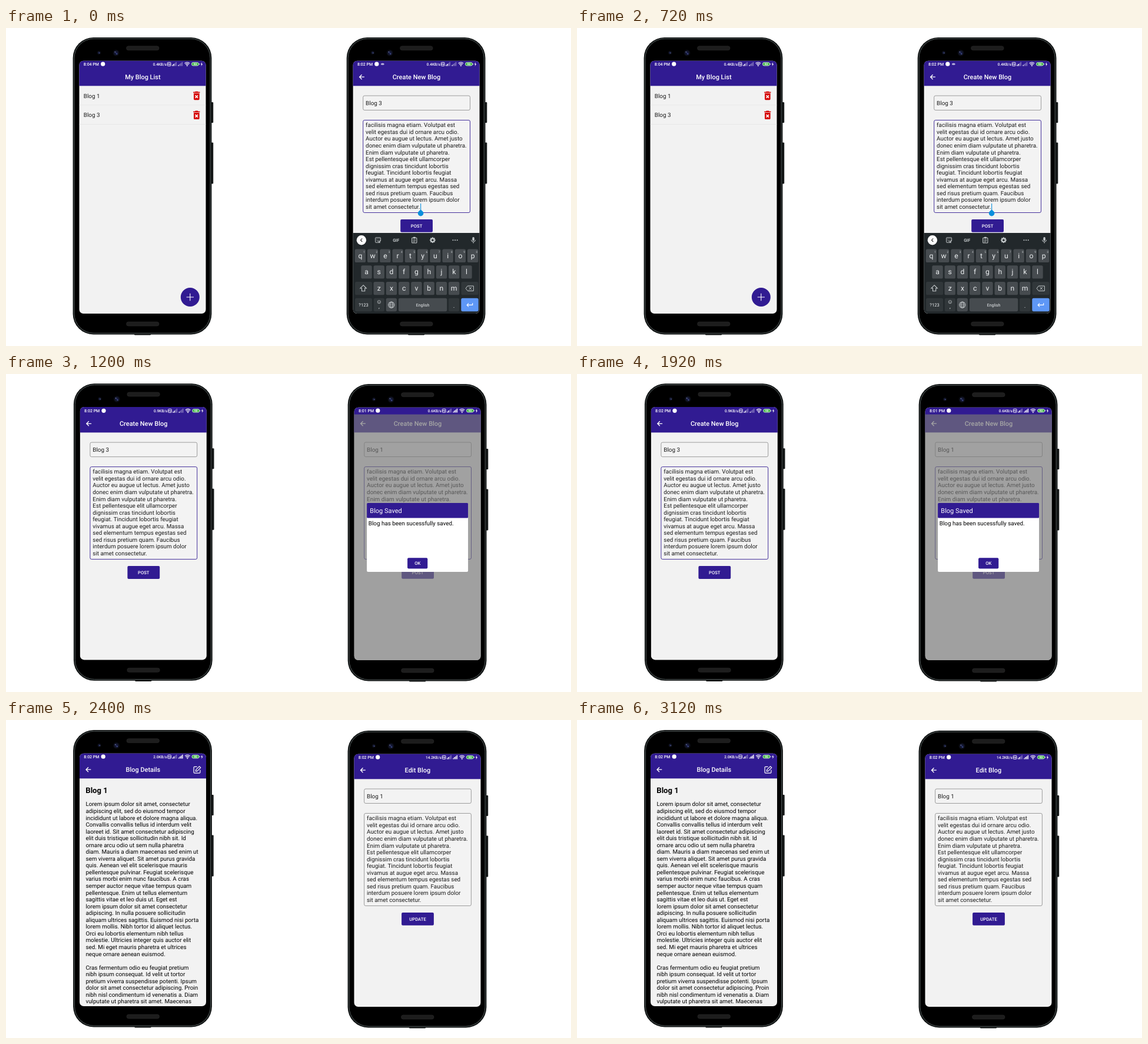
An HTML page that plays this animation: 960x540 px, repeating every 3.6 s.

```html
<!DOCTYPE html>
<html lang="en">
<head>
<meta charset="utf-8">
<title>Blog app screens</title>
<style>
  html, body { margin: 0; width: 100%; height: 100%; overflow: hidden; background: #fff; }
  svg { display: block; width: 100vw; height: 100vh; }
  text { font-family: Roboto, sans-serif; white-space: pre; text-rendering: geometricPrecision; }
</style>
</head>
<body>
<svg id="stage" viewBox="0 0 960 540">
  <defs>
    <clipPath id="screen"><rect x="124.5" y="55.7" width="215" height="429.4" rx="7"/></clipPath>
    <radialGradient id="lens"><stop offset="0" stop-color="#20285a"/><stop offset=".5" stop-color="#13162c"/><stop offset="1" stop-color="#050608"/></radialGradient>
  </defs>
</svg>
<script>
const INDIGO = '#311b92', INK = '#1c1c1c', LOOP = 3600;
const BODY = 9.9, LINE = 11.55;

const rect = (x, y, w, h, fill, r = 0, more = '') =>
  `<rect x="${x}" y="${y}" width="${w}" height="${h}" rx="${r}" fill="${fill}" ${more}/>`;
const disc = (x, y, r, fill) => `<circle cx="${x}" cy="${y}" r="${r}" fill="${fill}"/>`;
const line = (d, color = '#fff', w = 1, more = '') =>
  `<path d="${d}" fill="none" stroke="${color}" stroke-width="${w}" ${more}/>`;
const text = (x, y, s, size = BODY, fill = INK, weight = 400, anchor = 'start') =>
  `<text x="${x}" y="${y}" font-size="${size}" fill="${fill}" font-weight="${weight}" text-anchor="${anchor}">${s}</text>`;
const mid = (x, y, s, size, fill, weight) => text(x, y, s, size, fill, weight, 'middle');
const group = (x, y, inner, scale = 1) => `<g transform="translate(${x} ${y}) scale(${scale})">${inner}</g>`;
const lines = (x, y, rows, fill) => rows.map((s, i) => text(x, y + i * LINE, s, BODY, fill)).join('');

function phone(x, y, content, shift = 0) {
  const slot = y => rect(204.5, y, 55.5, 7, '#1d1d1d', 3.5, 'stroke="#2b2b2b" stroke-width=".6"');
  const frame =
    rect(348, 126, 4.2, 35, '#151818', 1) + rect(348, 194.5, 4.2, 70, '#151818', 1) +
    rect(218, 518, 28, 3.6, '#1c1f1f', 1) +
    rect(113.6, 16, 235.8, 504.5, '#111414', 35) +
    rect(116, 18.2, 231, 500, '#000', 33, 'stroke="#596060" stroke-width=".9"') +
    slot(30.7) + slot(499) +
    disc(158, 42, 3.2, 'url(#lens)') + disc(187, 42.3, 5.6, 'url(#lens)') +
    disc(185.3, 40.8, .8, '#8791c8') + disc(188.3, 44, 1, '#4b579c') + disc(158.8, 42.4, .6, '#7380a8');
  return group(x, y, frame + `<g clip-path="url(#screen)">` +
    rect(124, 54, 216, 432, '#f2f2f2') + group(0, shift, content) + '</g>');
}

function signal(x, full) {
  return [0, 1, 2, 3].map(i =>
    rect(x + i * 2.1, 62.8 - i * 1.7, 1.5, 1.8 + i * 1.7, '#fff', .2, `opacity="${i < full ? .95 : .4}"`)).join('');
}

function status(time, rate, full) {
  return rect(124, 50, 216, 48.3, INDIGO) +
    text(131.8, 63.8, time, 7, '#fff', 500) + disc(164.7, 61.2, 3.6, '#fff') +
    text(272.8, 63.7, rate, 6.45, '#fff', 500, 'end') +
    rect(274.2, 58.4, 5.8, 6, 'none', 1, 'stroke="#fff" stroke-width=".9"') +
    line('M275.7 63V60L278.5 63V60', '#fff', .8) +
    signal(282, 2) + signal(292.3, full) +
    line('M303.4 60.2Q307.8 56.4 312.2 60.2M304.9 61.9Q307.8 59.4 310.7 61.9M306.3 63.4Q307.8 62.1 309.3 63.4', '#fff', 1.1) +
    disc(307.8, 64.5, .8, '#fff') +
    rect(315.4, 58.6, 12, 5.4, '#43b649', 2.5, 'stroke="#e4f5e5" stroke-width=".8"') +
    rect(328, 60.3, 1, 2, '#e4f5e5', .4) + mid(321.4, 63.1, '90', 4.6, '#fff', 700) +
    '<path d="M333 58L330.7 61.8H332.2L331.6 65L334.1 60.9H332.5Z" fill="#fff"/>';
}

const title = s => mid(232.4, 87.4, s, 10.94, '#fff', 500);
const back = line('M143.8 83.2H135.6M139.5 79.2L135.5 83.2L139.5 87.2', '#fff', 1.3);
const button = (x, y, w, h, s) =>
  rect(x, y, w, h, INDIGO, 2) + mid(x + w / 2, y + h / 2 + 2.8, s, 7.66, '#fff', 500);

const lorem = [
  'facilisis magna etiam. Volutpat est', 'velit egestas dui id ornare arcu odio.',
  'Auctor eu augue ut lectus. Amet justo', 'donec enim diam vulputate ut pharetra.',
  'Enim diam vulputate ut pharetra.', 'Est pellentesque elit ullamcorper',
  'dignissim cras tincidunt lobortis', 'feugiat. Tincidunt lobortis feugiat',
  'vivamus at augue eget arcu. Massa', 'sed elementum tempus egestas sed',
  'sed risus pretium quam. Faucibus', 'interdum posuere lorem ipsum dolor',
  'sit amet consectetur.'];

function form(name, action, focused) {
  const border = focused ? `stroke="${INDIGO}" stroke-width=".9"` : 'stroke="#777" stroke-width=".7"';
  return rect(141.6, 115, 181.8, 24.5, '#f3f3f3', 2.5, 'stroke="#777" stroke-width=".7"') +
    text(146, 131.2, name) +
    rect(141.6, 156.5, 181.8, 157, '#f3f3f3', 2.5, border) +
    lines(146, 168.3, lorem) + button(205.1, 325, 54.8, 21.8, action);
}

function listScreen() {
  const bin = '<path d="M6 19c0 1.1.9 2 2 2h8c1.1 0 2-.9 2-2V7H6zM15.5 4l-1-1h-5l-1 1H5v2h14V4z" fill="#d50000"/>' +
    line('M9.2 11.2L14.8 16.8M14.8 11.2L9.2 16.8', '#fff', 2);
  const row = (y, s) => text(131.8, y + 20.6, s) + group(314.2, y + 7.4, bin, .8) +
    rect(124, y + 32.6, 216, .6, '#e2e2e2');
  return status('8:04 PM', '0.4KB/s', 1) + title('My Blog List') + row(98, 'Blog 1') + row(130.8, 'Blog 3') +
    disc(312.8, 457, 16, INDIGO) + line('M306.6 457H319M312.8 450.8V463.2', '#fff', 1.1);
}

function keyboard() {
  const KEY = '#464b4f', DARK = '#31373a', W = '#eceff1', SOFT = '#c3c8ca';
  const key = (x, y, w, fill = KEY) => rect(x, y, w, 22.4, fill, 2.6);
  const row = (s, x, y) => [...s].map((c, i) => {
    const kx = x + i * 21.25;
    return key(kx - 9.2, y, 18.4) + mid(kx, y + 15, c, 12.2, W) +
      (s.length > 9 ? text(kx + 8, y + 6.8, (i + 1) % 10, 4.8, SOFT, 400, 'end') : '');
  }).join('');
  const dots = [-3.6, 0, 3.6].map(d => disc(298 + d, 360.2, 1, SOFT)).join('');
  const gear = [0, 45, 90, 135].map(a => line('M259.8 355.3V365.1', SOFT, 2, `transform="rotate(${a} 259.8 360.2)"`)).join('');
  const tools = disc(138.8, 360.2, 8.2, '#fff') + line('M140.2 357.4L137.4 360.2L140.2 363', '#333', 1.1) +
    line('M171 364.3H163.2Q162.6 364.3 162.6 363.7V356.5Q162.6 355.9 163.2 355.9H170.8Q171.4 355.9 171.4 356.5V361.5L168.6 364.3V361.5H171.4M164.6 360.6Q166.3 363 168 361.4', SOFT, 1) +
    disc(165.3, 358.3, .7, SOFT) + disc(168.8, 358.3, .7, SOFT) +
    mid(197.6, 362.8, 'GIF', 7.3, SOFT, 700) +
    rect(224.6, 356.2, 8.2, 8.8, 'none', 1, `stroke="${SOFT}" stroke-width="1.1"`) + rect(226.8, 354.8, 3.8, 2.8, SOFT, .6) +
    line('M226.5 359.6H231M226.5 361.6H231M226.5 363.3H229.5', SOFT, .8) +
    gear + disc(259.8, 360.2, 3.7, SOFT) + disc(259.8, 360.2, 1.7, '#22282b') + dots +
    rect(327.3, 355, 3.4, 6.4, SOFT, 1.7) + line('M325.4 359.8Q325.8 363.2 329 363.2Q332.2 363.2 332.6 359.8M329 363.2V365.6', SOFT, 1);
  const shift = line('M142 436.7L147.2 442H144.6V446.7H139.4V442H136.8Z', SOFT, 1.1);
  const erase = line('M319.3 438H329.2V446.4H319.3L316 442.2ZM321.5 440L325.9 444.4M325.9 440L321.5 444.4', SOFT, 1);
  const globe = line('M184.6 470.2H194.8M185.5 467H193.9M185.5 473.4H193.9', SOFT, .9) +
    `<g fill="none" stroke="${SOFT}" stroke-width=".9"><circle cx="189.7" cy="470.2" r="5.2"/><ellipse cx="189.7" cy="470.2" rx="2.4" ry="5.2"/></g>`;
  const smile = `<circle cx="168.8" cy="465.2" r="2.7" fill="none" stroke="${SOFT}" stroke-width=".7"/>` +
    disc(167.8, 464.5, .45, SOFT) + disc(169.8, 464.5, .45, SOFT) + line('M167.3 465.8Q168.8 467.6 170.3 465.8', SOFT, .6);
  return rect(124, 348, 216, 140, '#22282b') + tools +
    row('qwertyuiop', 136.8, 375.6) + row('asdfghjkl', 147.4, 403.2) + row('zxcvbnm', 168.6, 430.9) +
    key(128, 430.9, 29, DARK) + shift + key(308.4, 430.9, 29, DARK) + erase +
    key(128, 458.8, 29, DARK) + mid(142.4, 472.8, '?123', 7.6, W) +
    key(159.6, 458.8, 18.4, DARK) + smile + mid(168.8, 475.6, ',', 9, W) +
    key(180.5, 458.8, 18.4) + globe +
    key(201.8, 458.8, 82.4) + mid(243, 472.7, 'English', 7, W) +
    key(286.8, 458.8, 18.4, DARK) + mid(296, 474.8, '.', 10, W) +
    key(308.2, 458.8, 29.4, '#5e97f6') + line('M327.6 467V470.4H318.2M321 467.4L318 470.4L321 473.4', '#fff', 1.1);
}

function typingScreen() {
  return status('8:02 PM', '0.4KB/s', 1) + rect(172, 59.7, 5.4, 3, '#b9b2dc', 1.5) + title('Create New Blog') + back +
    form('Blog 3', 'POST', true) + rect(239, 298, 1.1, 12, '#0a8fdc') +
    '<path d="M239.5 308.2L243 311.4A4.8 4.8 0 1 1 236 311.4Z" fill="#0a8fdc"/>' + keyboard();
}

function createScreen() {
  return status('8:02 PM', '0.9KB/s', 1) + title('Create New Blog') + back + form('Blog 3', 'POST', true);
}

function savedScreen() {
  return status('8:01 PM', '0.6KB/s', 4) + title('Create New Blog') + back + form('Blog 1', 'POST', true) +
    rect(124, 67.6, 216, 420, '#777', 0, 'opacity=".66"') +
    rect(146, 218, 172, 117, '#fff', 2) + rect(146, 218, 172, 25.4, INDIGO, 1.5) +
    text(151.2, 234.5, 'Blog Saved', 11, '#fff') +
    text(148.7, 256.3, 'Blog has been sucessfully saved.', BODY, '#000') +
    button(215, 311.2, 34.2, 18.4, 'OK');
}

function detailScreen() {
  const article = [
    'Lorem ipsum dolor sit amet, consectetur', 'adipiscing elit, sed do eiusmod tempor',
    'incididunt ut labore et dolore magna aliqua.', 'Convallis convallis tellus id interdum velit',
    'laoreet id. Sit amet consectetur adipiscing', 'elit duis tristique sollicitudin nibh sit. Id',
    'ornare arcu odio ut sem nulla pharetra', 'diam. Mauris a diam maecenas sed enim ut',
    'sem viverra aliquet. Sit amet purus gravida', 'quis. Aenean vel elit scelerisque mauris',
    'pellentesque pulvinar. Feugiat scelerisque', 'varius morbi enim nunc faucibus. A cras',
    'semper auctor neque vitae tempus quam', 'pellentesque. Enim ut tellus elementum',
    'sagittis vitae et leo duis ut. Eget est', 'lorem ipsum dolor sit amet consectetur',
    'adipiscing. In nulla posuere sollicitudin', 'aliquam ultrices sagittis. Euismod nisi porta',
    'lorem mollis. Nibh tortor id aliquet lectus.', 'Orci eu lobortis elementum nibh tellus',
    'molestie. Ultricies integer quis auctor elit', 'sed. Mi eget mauris pharetra et ultrices',
    'neque ornare aenean euismod.', '',
    'Cras fermentum odio eu feugiat pretium', 'nibh ipsum consequat. Id velit ut tortor',
    'pretium viverra suspendisse potenti. Ipsum', 'dolor sit amet consectetur adipiscing. Proin',
    'nibh nisl condimentum id venenatis a. Diam', 'vulputate ut pharetra sit amet. Maecenas'];
  const edit = line('M324 78.4H319.8Q318.6 78.4 318.6 79.6V88Q318.6 89.2 319.8 89.2H328.2Q329.4 89.2 329.4 88V83.8' +
    'M328 77.6L330.3 79.9L324.6 85.6L321.8 86.1L322.3 83.3Z', '#fff', 1.2, 'stroke-linejoin="round"');
  return status('8:02 PM', '2.0KB/s', 4) + title('Blog Details') + back + edit +
    text(134.8, 123.2, 'Blog 1', 13.1, '#000', 700) + lines(134.9, 145.4, article, '#000');
}

function editScreen() {
  return status('8:02 PM', '14.2KB/s', 4) + title('Edit Blog') + back + form('Blog 1', 'UPDATE', false);
}

const scenes = [
  phone(0, 0, listScreen()) + phone(465.1, 0, typingScreen()),
  phone(1.3, .3, createScreen(), .8) + phone(467.1, 1, savedScreen()),
  phone(.5, 1, detailScreen()) + phone(467, 2, editScreen())
];

const stage = document.getElementById('stage');
scenes.forEach((markup, i) => {
  const g = document.createElementNS(stage.namespaceURI, 'g');
  g.innerHTML = markup;
  stage.append(g);
  const steps = [0, 1, 2, 0].map(k => ({ opacity: k === i ? 1 : 0, easing: 'step-end' }));
  g.animate(steps, { duration: LOOP, iterations: Infinity });
});
</script>
</body>
</html>
```
